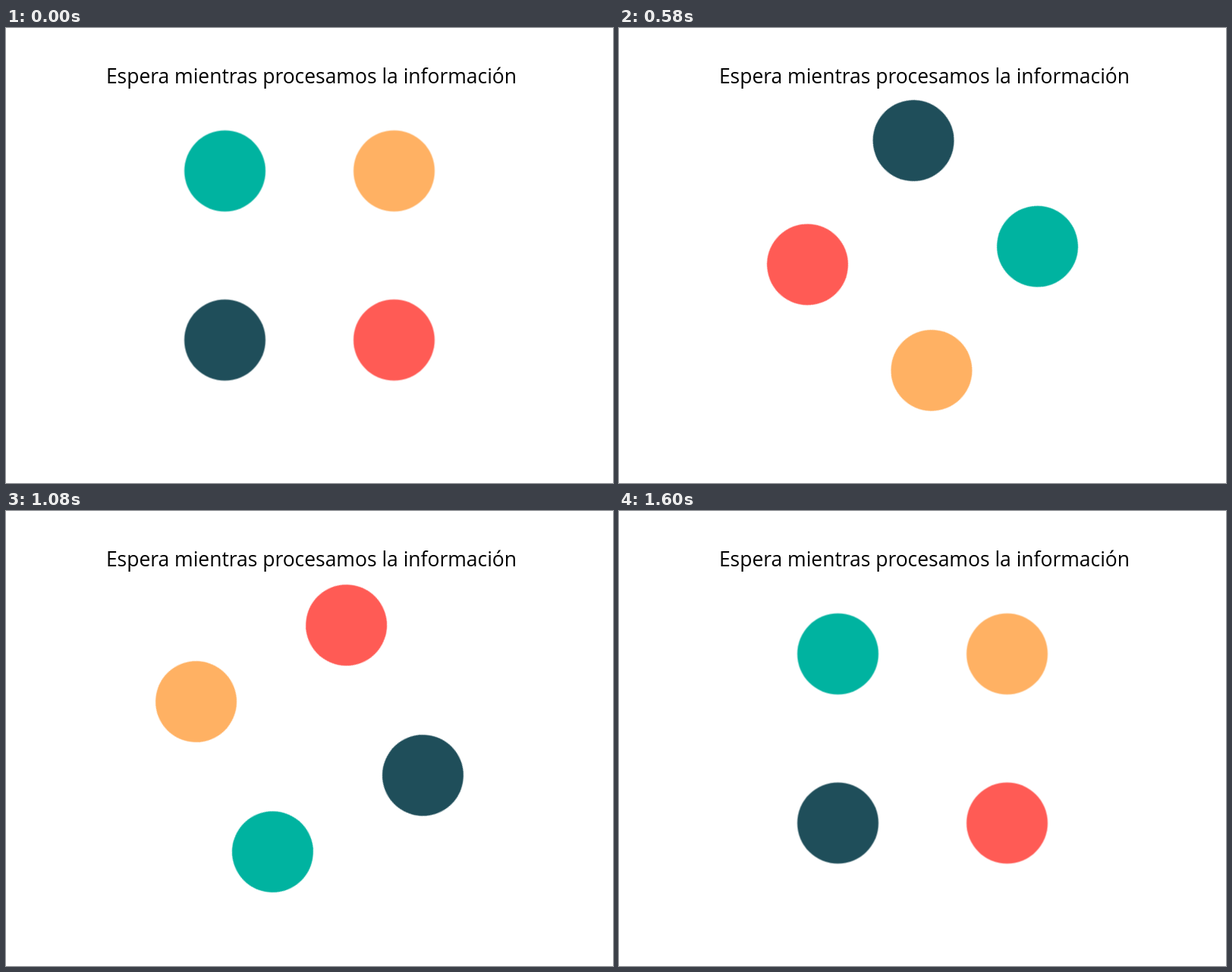
An HTML page for the animation above (1620 ms loop, 800x600 px).

```html
<!DOCTYPE html>
<html lang="es">
<head>
<meta charset="utf-8">
<title>Espera</title>
<style>
  html, body { margin: 0; width: 100%; height: 100%; overflow: hidden; background: #fff; }
  svg { display: block; width: 800px; height: 600px; }
  text { font: 26.45px "Open Sans", "Noto Sans", sans-serif; fill: #000; }

  .spin { animation: spin 1620ms -2ms infinite; }
  .spin circle { r: 53.5px; animation: pulse 1620ms infinite; }
  .green  { fill: #00b3a0; }
  .orange { fill: #ffb163; rotate: 90deg; }
  .red    { fill: #ff5b55; rotate: 180deg; }
  .dark   { fill: #1f4e5a; rotate: 270deg; }

  /* one turn in 1600 ms, 20 ms per step, then a short rest */
  @keyframes spin {
    0% { transform: rotate(0deg); animation-timing-function: steps(80); }
    98.765%, 100% { transform: rotate(360deg); }
  }

  /* three pulses per turn: quick pull inwards, slow release */
  @keyframes pulse {
    0%, 32.922%, 65.844% {
      transform: translate(-111.5px, -111.5px);
      animation-timing-function: cubic-bezier(.45, 0, .9, .95);
    }
    11.358%, 44.28%, 77.202% {
      transform: translate(-68px, -68px);
      animation-timing-function: cubic-bezier(.12, .2, .4, .97);
    }
    98.765%, 100% { transform: translate(-111.5px, -111.5px); }
  }
</style>
</head>
<body>
<svg viewBox="0 0 800 600">
  <text x="131.9" y="73">Espera mientras procesamos la información</text>
  <g transform="translate(400 300)">
    <g class="spin">
      <circle class="green" r="53.5"/>
      <circle class="orange" r="53.5"/>
      <circle class="red" r="53.5"/>
      <circle class="dark" r="53.5"/>
    </g>
  </g>
</svg>
</body>
</html>
```
